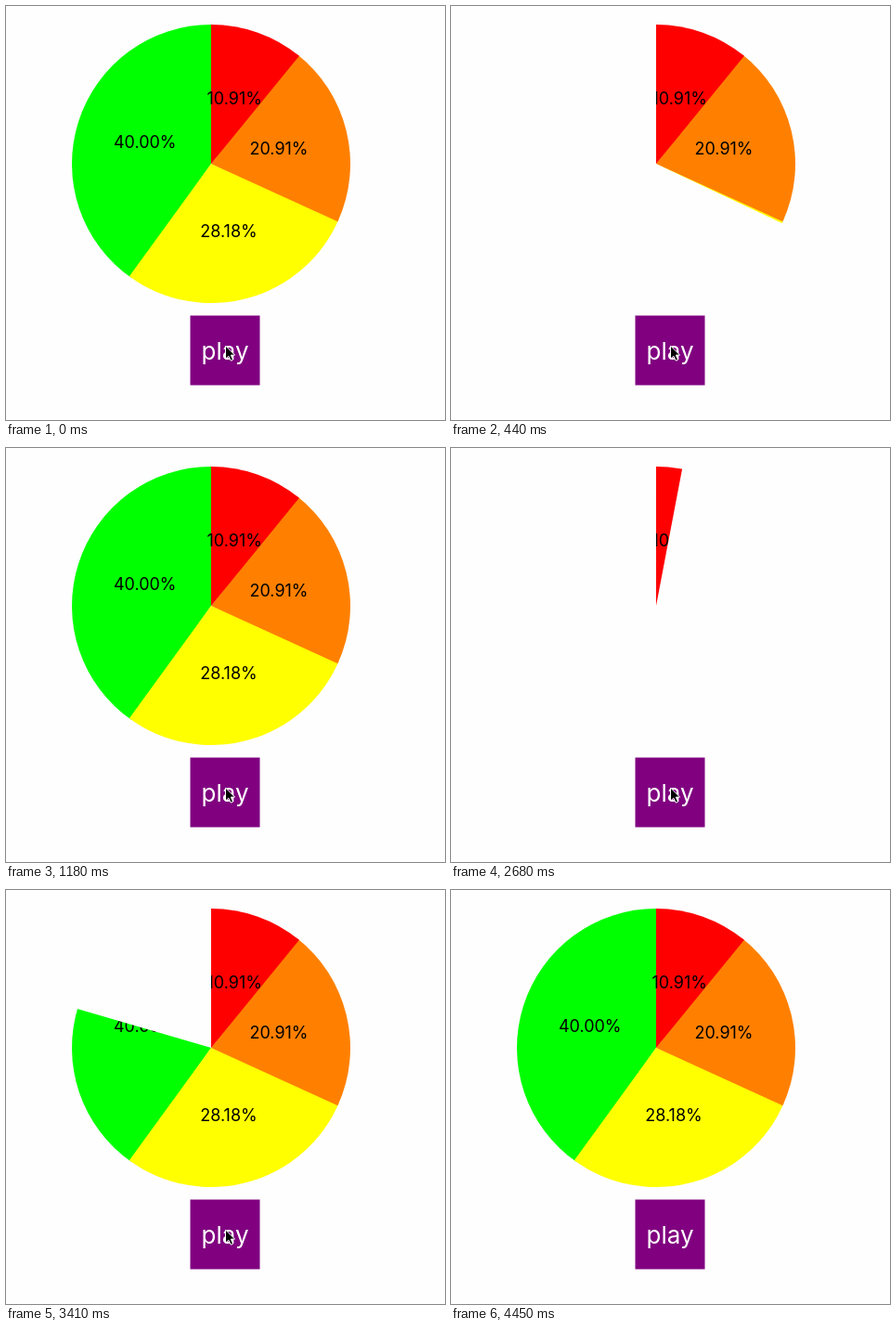
An HTML page that plays this animation: 473 px wide and 446 px high, repeating every 5250 ms.

```html
<!DOCTYPE html>
<html lang="en">
<head>
<meta charset="utf-8">
<title>Pie chart</title>
<style>
  html, body {
    margin: 0;
    width: 100%;
    height: 100%;
    overflow: hidden;
    background: #fefefe;
  }
  svg { display: block; }
  text {
    font-family: Inter, "Liberation Sans", sans-serif;
    text-anchor: middle;
  }
  .labels { font-size: 18px; }
  .play { font-size: 26px; fill: #fff; }

  /* Dash offset = 360 minus the swept angle in degrees */
  .sweep {
    fill: none;
    stroke: #fff;
    stroke-width: 160;
    stroke-dasharray: 360 360;
    animation: sweep 5250ms step-end infinite;
  }
  .cursor { animation: cursor 5250ms step-end infinite; }

  @keyframes sweep {
    0%       { stroke-dashoffset: 0; }
    2.666%   { stroke-dashoffset: 354; }
    5.523%   { stroke-dashoffset: 300.7; }
    8.38%    { stroke-dashoffset: 244.7; }
    11.238%  { stroke-dashoffset: 193; }
    14.095%  { stroke-dashoffset: 141.2; }
    16.952%  { stroke-dashoffset: 87.3; }
    19.809%  { stroke-dashoffset: 33.6; }
    22.476%  { stroke-dashoffset: 0; }
    51.047%  { stroke-dashoffset: 349.2; }
    53.904%  { stroke-dashoffset: 286.3; }
    56.571%  { stroke-dashoffset: 238.2; }
    59.428%  { stroke-dashoffset: 180; }
    62.095%  { stroke-dashoffset: 128.1; }
    64.952%  { stroke-dashoffset: 73.7; }
    67.809%  { stroke-dashoffset: 20; }
    70.666%  { stroke-dashoffset: 0; }
    100%     { stroke-dashoffset: 0; }
  }
  @keyframes cursor {
    0%       { transform: translate(0, 0); visibility: visible; }
    79.238%  { transform: translate(148px, 58px); visibility: visible; }
    81.904%  { transform: translate(190px, 78px); visibility: visible; }
    84.761%  { transform: translate(190px, 78px); visibility: hidden; }
    100%     { transform: translate(190px, 78px); visibility: hidden; }
  }
</style>
</head>
<body>
<svg width="473" height="446" viewBox="0 0 473 446">
  <defs>
    <mask id="reveal" maskUnits="userSpaceOnUse" x="61" y="10" width="320" height="320">
      <circle class="sweep" cx="221" cy="170" r="80" pathLength="360" transform="rotate(-90 221 170)"/>
    </mask>
  </defs>

  <g mask="url(#reveal)">
    <!-- Each slice tucks slightly under the one before it to avoid seams -->
    <path fill="#0f0" d="M221 170L134.96 292.87A150 150 0 0 1 221 20Z"/>
    <path fill="#ff0" d="M221 170L359.08 228.61A150 150 0 0 1 132.83 291.35Z"/>
    <path fill="#ff8000" d="M221 170L313.35 51.8A150 150 0 0 1 357.44 232.31Z"/>
    <path fill="#f00" d="M221 170V20A150 150 0 0 1 315.95 53.87Z"/>
    <g class="labels">
      <text x="246.2" y="106">10.91%</text>
      <text x="294" y="159.6">20.91%</text>
      <text x="240" y="249.1">28.18%</text>
      <text x="149.7" y="153.4">40.00%</text>
    </g>
  </g>

  <rect x="198.5" y="333.5" width="75" height="75" fill="#800080"/>
  <text class="play" x="236" y="380.5">play</text>

  <g class="cursor">
    <path d="M236.5 366V380.2L239.8 377.1L242.2 382.2L244.6 381.1L242.3 376.1H246.6Z"
          fill="#000" stroke="#fff" stroke-width="1"/>
  </g>
</svg>
</body>
</html>
```
